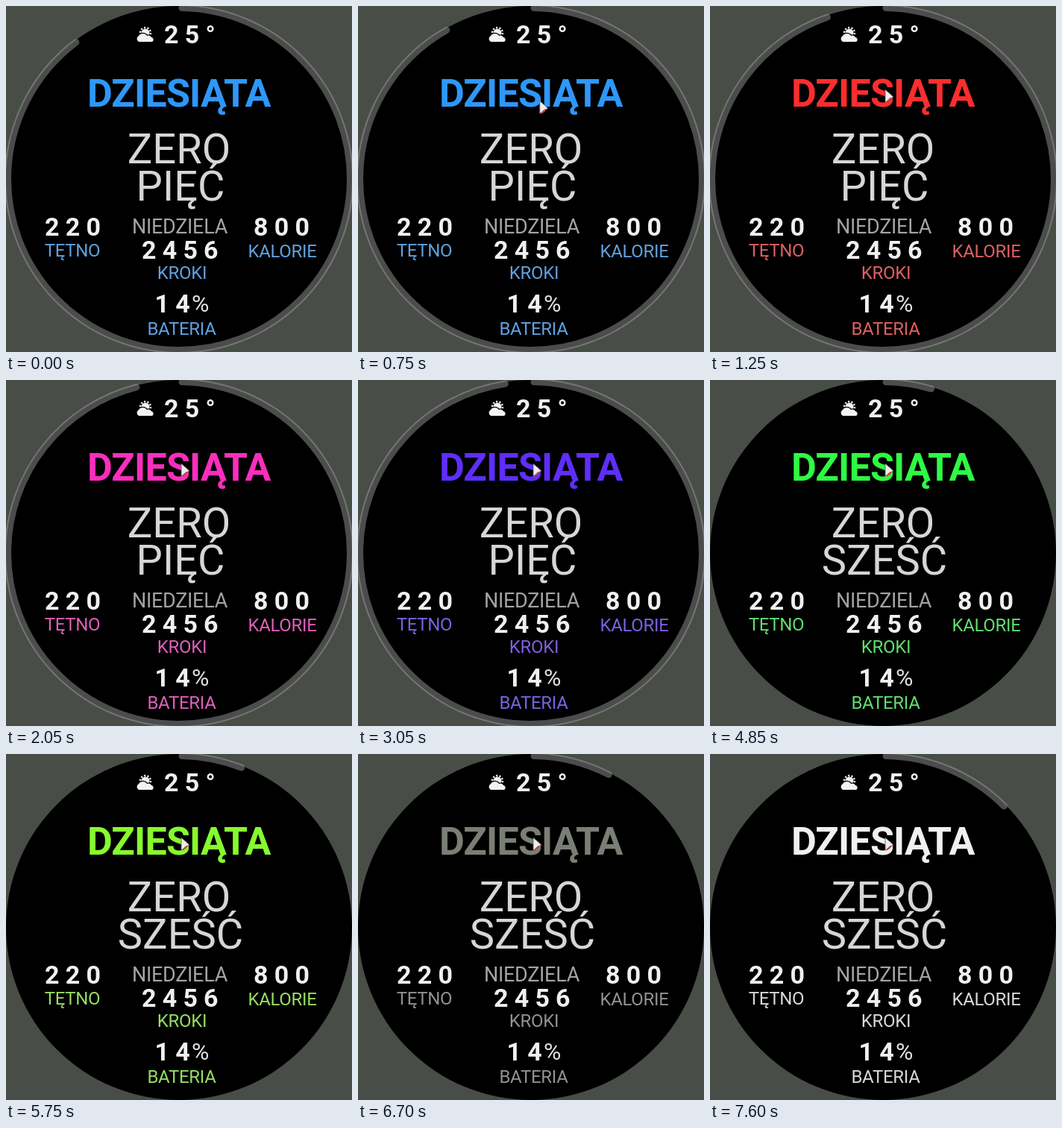
These frames come from a looping animation (464 px wide and 464 px high, 8 s). An HTML page:

```html
<!DOCTYPE html>
<html lang="pl">
<head>
<meta charset="utf-8">
<title>Tarcza zegarka</title>
<style>
html, body { margin: 0; width: 100%; height: 100%; overflow: hidden; background: #494d47; }
svg { display: block; width: 464px; height: 464px; }
text { font-family: Roboto, "Open Sans", sans-serif; white-space: pre; }
.hour { font-size: 52px; font-weight: 700; letter-spacing: -.8px; }
.minute { font-size: 56px; fill: #d6d6d6; }
.day { font-size: 27px; letter-spacing: -.3px; fill: #a4a4a4; }
.num { font-size: 34px; font-weight: 700; letter-spacing: 8.2px; fill: #f0f0f0; }
.label { font-size: 24px; letter-spacing: -.3px; }
.mid { text-anchor: middle; }
</style>
</head>
<body>
<svg viewBox="0 0 464 464">
  <circle cx="232" cy="232" r="232"/>
  <circle id="ring" cx="232" cy="232" r="229.5" fill="none" stroke="#a4a6a4" stroke-opacity=".46"
    stroke-width="9" stroke-linecap="round" pathLength="360" transform="rotate(-89 232 232)"/>

  <g id="weather" fill="#f2f2f2">
    <circle cx="187" cy="36" r="5.5"/>
    <circle cx="187" cy="36" r="7" fill="none" stroke="#f2f2f2" stroke-width="2.4" stroke-dasharray="2.2 2.2"/>
    <path d="M178 48a4.5 4.5 0 0 1 0-8a6 5 0 0 1 11 0a4.5 4.5 0 0 1 6 2a3.2 3.2 0 0 1 1 6z"
      stroke="#000" stroke-width="2.4" paint-order="stroke"/>
  </g>
  <text class="num" x="212" y="50">25°</text>

  <text class="hour mid" id="hour" x="231.8" y="135">DZIESIĄTA</text>
  <text class="minute mid" x="232" y="211">ZERO</text>
  <text class="minute mid" id="minute" x="234" y="261"></text>

  <text class="num" x="52" y="308">220</text>
  <text class="num" x="332" y="308">800</text>
  <text class="day mid" x="233" y="305">NIEDZIELA</text>
  <text class="num" x="182" y="339">2456</text>
  <text class="num" x="199.5" y="411">14</text>
  <text x="249" y="410" font-size="32" fill="#e0e0e0">%</text>

  <g id="labels">
    <text class="label mid" x="89" y="336">TĘTNO</text>
    <text class="label mid" x="370.5" y="337">KALORIE</text>
    <text class="label mid" x="236" y="366">KROKI</text>
    <text class="label mid" x="235.5" y="441">BATERIA</text>
  </g>

  <g id="cursor">
    <path d="M0 0L11 10L0 17Z" fill="#ececec" stroke="#555" stroke-width=".8"/>
    <path d="M10 10Q3 12 1 18L6 15Z" fill="#c8443c"/>
  </g>
</svg>
<script>
const LOOP = 8000;
const NEXT_MINUTE = 3350;
const $ = id => document.getElementById(id);
const mix = (a, b, k) => a + (b - a) * k;
const progress = (t, from, to) => Math.min(1, Math.max(0, (t - from) / (to - from)));

// [time, degrees] of the seconds ring
const sweepKeys = [
  [400, 323], [1250, 341], [NEXT_MINUTE, 353], [NEXT_MINUTE, 0], [3950, 0],
  [4800, 16.4], [5350, 16.4], [6200, 27], [6700, 27], [7550, 45]
];

function sweepAt(t) {
  const i = sweepKeys.findIndex(key => t < key[0]);
  if (i < 1) return sweepKeys.at(i)[1];
  const [[t0, a], [t1, b]] = sweepKeys.slice(i - 1, i + 1);
  return mix(a, b, progress(t, t0, t1));
}

// Each tap moves down the colour wheel; the last ones climb from grey to white.
function themeAt(t) {
  if (t >= 6100) {
    const step = Math.max(0, Math.floor((t - 6650) / 450));
    return `hsl(90 4% ${48 + 23 * step}%)`;
  }
  const wheel = 318 - 32 * Math.floor((t - 1850) / 500);
  const hue = t < 900 ? 209 : t < 1850 ? 0 : wheel;
  return `hsl(${hue} 95% 58%)`;
}

function draw(t) {
  const color = themeAt(t);
  $("hour").setAttribute("fill", color);
  $("labels").style.fill = `color-mix(in srgb, ${color} 62%, #aeb2b6)`;

  const sweep = sweepAt(t);
  $("ring").style.visibility = sweep > 1 ? "visible" : "hidden";
  $("ring").setAttribute("stroke-dasharray", `${Math.max(0, sweep - 1)} 360`);

  $("minute").textContent = t < NEXT_MINUTE ? "PIĘĆ" : "SZEŚĆ";

  const k = 1 - (1 - progress(t, 400, 850)) ** 2;
  $("cursor").style.visibility = t >= 400 ? "visible" : "hidden";
  $("cursor").setAttribute("transform", `translate(${mix(416, 235, k)} ${mix(426, 112, k)})`);
}

function tick() {
  draw(performance.now() % LOOP);
  requestAnimationFrame(tick);
}
tick();
</script>
</body>
</html>
```
